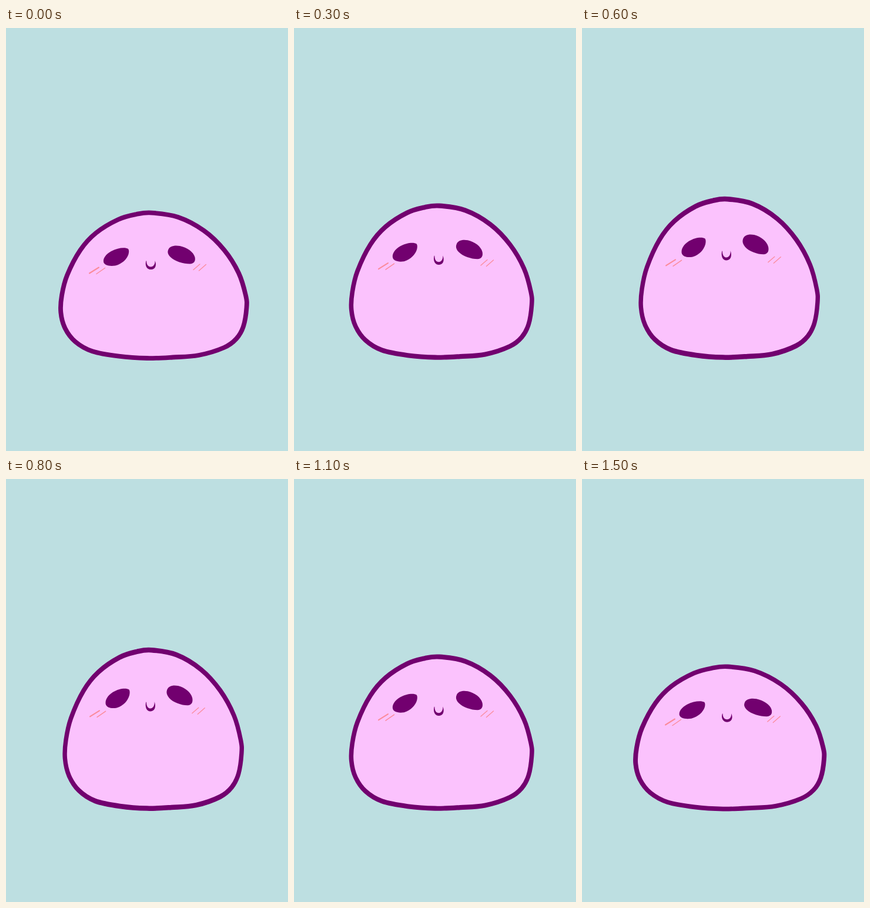
Write an HTML page that moves like this. It is 480x720 px and loops after 1600 ms.

```html
<!DOCTYPE html>
<html lang="en">
<head>
<meta charset="utf-8">
<title>Squishy blob</title>
<style>
  html, body { margin: 0; width: 100%; height: 100%; overflow: hidden; background: #bddfe1; }
  svg { display: block; width: 100vw; height: 100vh; }
</style>
</head>
<body>
<svg viewBox="0 0 480 720">
  <path id="body" fill="#fbc2fd" stroke="#72006f" stroke-width="7.8" stroke-linejoin="round"/>
  <g fill="#72006f">
    <path id="eyeL" d="M208 376C203 373 190 374 179 380C170 385 165 392 166 398C167 404 176 406 186 404.5C198 401.5 206 393 208.5 385C209.5 381 209.5 378 208 376Z"/>
    <path id="eyeR" d="M276 378C278 371 287 369.5 296 371C308 373.5 319 381 321.5 390C323 397 320 401 313 401.5C302 401.5 287 397 280 390C276 386 274.5 382 276 378Z"/>
    <path id="mouth" d="M238.5 396.3C236 404 239.5 411 246.5 411C254 411 257 404 253.5 396C254 402 251 406.5 246.5 406.5C241.5 406.5 239 402 239.2 396.5Z"/>
  </g>
  <g fill="none" stroke="#fb8b9b" stroke-linecap="round">
    <g id="cheekL">
      <path stroke-width="2.1" d="M142 417.5L158 407.5"/>
      <path stroke-width="1.5" d="M154 418.5L168.5 408.5"/>
    </g>
    <path id="cheekR" stroke-width="1.3" d="M319 411.5L330 402M328.5 413L340.5 402.5"/>
  </g>
</svg>
<script>
const STEP = 100, STEPS = 16, PEAK = 7;
const $ = id => document.getElementById(id);

// Closed smooth curve through the outline points
const outline = [
  [248, 314.6], [293, 322], [337, 345], [371.5, 378], [396, 417], [408, 455],
  [409.5, 476], [404, 508], [392, 529], [371, 544], [328, 557], [284, 560.5],
  [240, 562], [192, 558.7], [147, 550.3], [118, 534], [100.5, 511], [93.3, 484],
  [95, 455], [104, 421], [126.5, 378], [153, 349], [191, 326], [222, 317]
];

function smooth(pts) {
  const at = i => pts[(i + pts.length) % pts.length];
  const handle = (p, a, b, s) => p.map((v, j) => (v + s * (b[j] - a[j]) / 6).toFixed(2));
  return 'M' + pts[0] + pts.map((p, i) => {
    const q = at(i + 1);
    return `C${handle(p, at(i - 1), q, 1)} ${handle(q, p, at(i + 2), -1)} ${q}`;
  }).join('') + 'Z';
}
$('body').setAttribute('d', smooth(outline));

// Stretch level: body left, right, top, bottom, then part centres
const poses = [
  { k: 0, box: [87, 416.5, 315.6, 565], eyeL: [187.5, 393], eyeR: [299.7, 389], mouth: [247, 406.5], cheekL: [155, 413.7], cheekR: [326.5, 408.5] },
  { k: 1, box: [89, 414, 310.7, 565.5], eyeL: [187.5, 389.5], eyeR: [298.7, 386], mouth: [246.5, 403.7], cheekL: [155, 412.7], cheekR: [329.7, 407] },
  { k: 2, box: [90.5, 411.5, 306.6, 565.3], eyeL: [187.5, 387], eyeR: [298, 382.7], mouth: [246, 400.5], cheekL: [155.3, 410], cheekR: [328.7, 405] },
  { k: 4, box: [93.5, 409, 298.6, 564.3], eyeL: [188.8, 381.5], eyeR: [298.5, 377], mouth: [246.5, 395.3], cheekL: [157, 405.3], cheekR: [328.7, 399.5] },
  { k: 7, box: [96.3, 405.2, 287, 564.4], eyeL: [190, 373.2], eyeR: [295.5, 368.3], mouth: [246, 387.5], cheekL: [156, 399.5], cheekR: [327.5, 394.2] },
  { k: 8, box: [97, 404, 283, 564.4], eyeL: [190.5, 370], eyeR: [294.8, 365.5], mouth: [246, 385], cheekL: [156, 397.5], cheekR: [327.3, 392] }
];
const rest = poses[1];

function poseAt(k) {
  const n = Math.max(1, poses.findIndex(p => p.k >= k));
  const a = poses[n - 1], b = poses[n], f = (k - a.k) / (b.k - a.k);
  return name => a[name].map((v, i) => v + (b[name][i] - v) * f);
}

function place(id, [x, y], [x0, y0], sx = 1, sy = 1) {
  $(id).setAttribute('transform', `translate(${x} ${y}) scale(${sx} ${sy}) translate(${-x0} ${-y0})`);
}

function draw(k) {
  const pose = poseAt(k);
  const [l, r, t, b] = pose('box'), [l0, r0, t0, b0] = rest.box;
  const sx = (r - l) / (r0 - l0), sy = (b - t) / (b0 - t0);
  place('body', [l, b], [l0, b0], sx, sy);
  for (const id of ['eyeL', 'eyeR', 'mouth']) place(id, pose(id), rest[id], sx, sy);
  for (const id of ['cheekL', 'cheekR']) place(id, pose(id), rest[id]);
}

let shown = -1;
function tick() {
  const i = Math.floor(performance.now() / STEP) % STEPS;
  if (i !== shown) {
    shown = i;
    draw(PEAK + 1 - Math.abs(PEAK - i));
  }
  requestAnimationFrame(tick);
}
tick();
</script>
</body>
</html>
```
